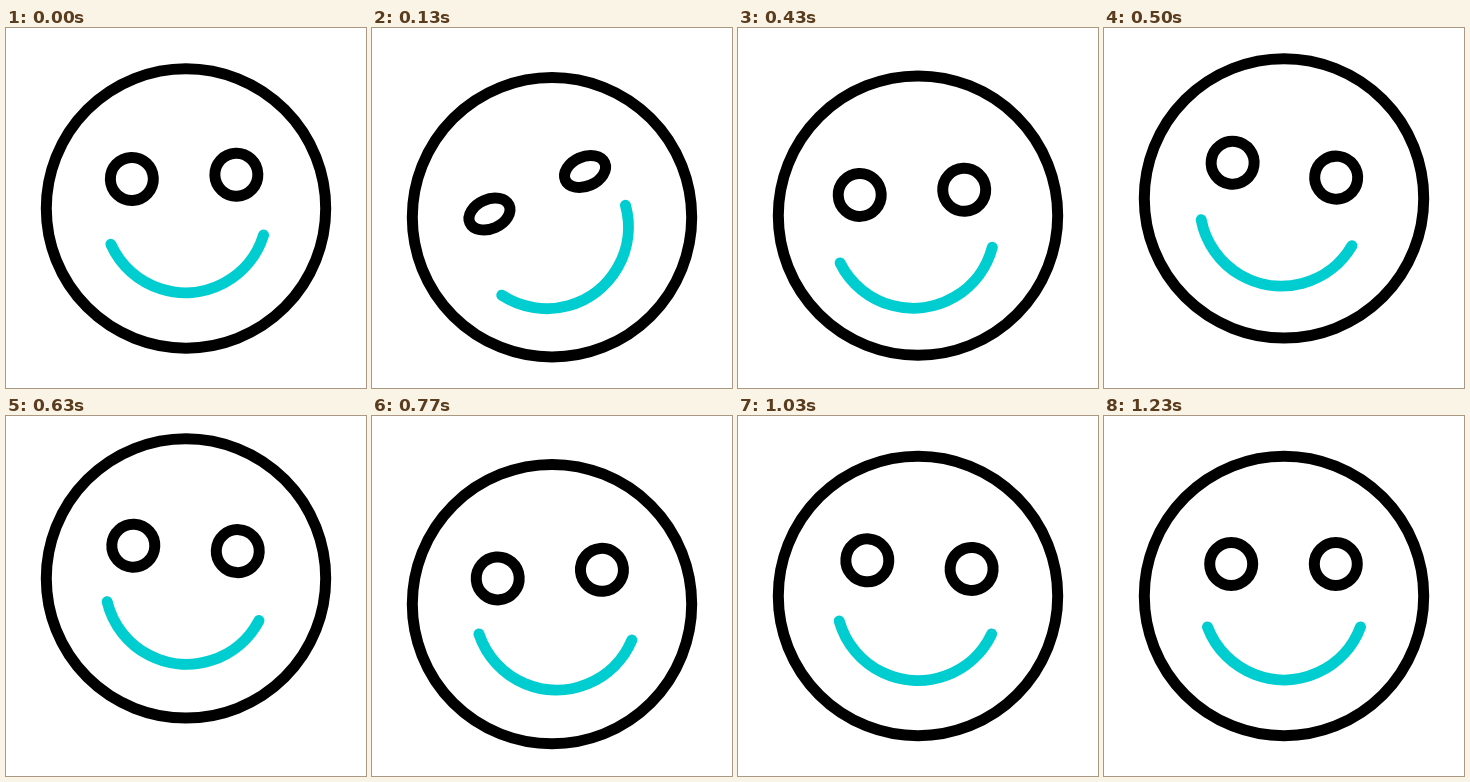
These frames come from a looping animation (360x360 px, 1670 ms). An HTML page with a canvas:

```html
<!DOCTYPE html>
<html lang="en">
<head>
<meta charset="utf-8">
<title>Smiley</title>
<style>
  html, body { margin: 0; height: 100%; overflow: hidden; background: #fff; }
  canvas { display: block; width: 100vw; height: 100vh; object-fit: contain; }
</style>
</head>
<body>
<canvas id="stage" width="360" height="360"></canvas>
<script>
const ctx = document.getElementById('stage').getContext('2d');
const LOOP = 1670;
const FRAME = 100 / 3;
const START = -FRAME;
const INK = '#000';
const TEAL = '#00cdd0';
const CENTER = 180;
const rad = degrees => degrees * Math.PI / 180;

function strokeEllipse(x, y, rx, ry, color, tilt = 0, from = 0, to = 2 * Math.PI) {
  ctx.strokeStyle = color;
  ctx.beginPath();
  ctx.ellipse(x, y, rx, ry, tilt, from, to);
  ctx.stroke();
}

function draw(t) {
  // Smooth 0 to 1 step between two times in ms.
  const ease = (from, to) => {
    const p = Math.min(1, Math.max(0, (t - from) / (to - from)));
    return (1 - Math.cos(Math.PI * p)) / 2;
  };

  // The head dips, leaps, lands and comes to rest.
  const faceY = CENTER + 21.7 * ease(START, 335) - 42.9 * ease(335, 588)
    + 30.3 * ease(588, 790) - 9.1 * ease(790, 1000);
  const sink = 14.4 * ease(START, 290) - 12.4 * ease(320, 560) - 2 * ease(767, 1200);

  // The features tilt left, then rock to and fro until level.
  const nod = ease(START, 133);
  const swing = ease(307, 520);
  const back = ease(520, 767);
  const forth = ease(767, 1033);
  const level = ease(1033, 1233);
  const eyesTilt = rad(-24 * nod + 32.9 * swing - 13.6 * back + 9.4 * forth - 4.7 * level);
  const mouthTilt = rad(-36 * nod + 46.8 * swing - 8.5 * back + 2.6 * forth - 4.9 * level);
  const drift = -3.3 * ease(133, 320) - 0.8 * swing + 5.3 * back - 2.1 * forth + 0.9 * level;

  const eyesX = CENTER - 0.5 + drift + 35 * Math.sin(eyesTilt);
  const mouthX = CENTER + drift + 9 * Math.sin(mouthTilt) + 3 * (back - forth);
  const featuresY = faceY + sink;
  const eyeOpen = 1 - 0.7 * (ease(105, 165) - ease(165, 260));

  ctx.fillStyle = '#fff';
  ctx.fillRect(0, 0, 360, 360);
  ctx.lineWidth = 11;
  ctx.lineCap = 'round';

  strokeEllipse(CENTER, faceY, 139.7, 139.7, INK);
  for (const reach of [-52.3, 52.3]) {
    strokeEllipse(eyesX + reach * Math.cos(eyesTilt),
      featuresY - 32 + reach * Math.sin(eyesTilt),
      21.5, 21.5 * eyeOpen, INK, eyesTilt);
  }
  strokeEllipse(mouthX, featuresY + 2.2, 81.7, 81.7, TEAL,
    mouthTilt, rad(20.6), rad(159.4));
}

function tick() {
  const t = performance.now() % LOOP;
  draw(Math.floor((t + 3.4) / FRAME) * FRAME);
  requestAnimationFrame(tick);
}
tick();
</script>
</body>
</html>
```
